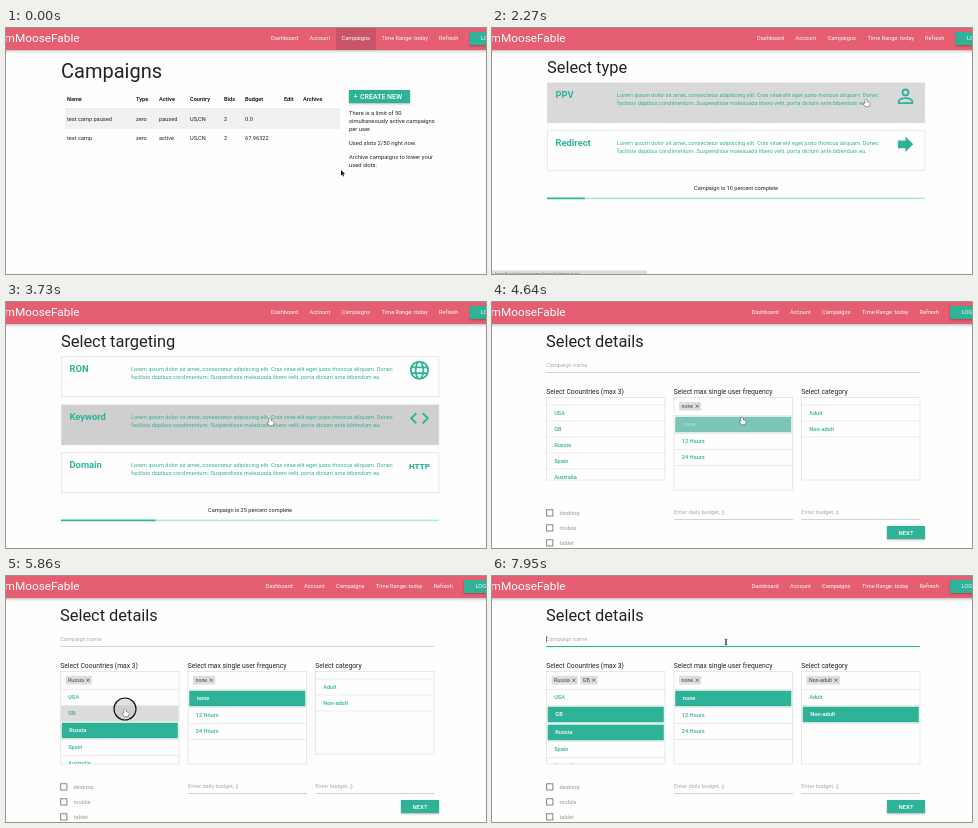
Write an HTML page with a canvas that moves like this. It is 480 by 246 pixels and loops after 8000 ms.

```html
<!DOCTYPE html>
<html lang="en">
<head>
<meta charset="utf-8">
<title>Campaign wizard</title>
<style>
html, body { margin: 0; width: 100%; height: 100%; overflow: hidden; background: #fefefe; }
canvas { display: block; width: 480px; height: 246px; }
</style>
</head>
<body>
<canvas id="stage"></canvas>
<script>
const W = 480, H = 246, LOOP = 8000;
const TEAL = '#2eb398', LINE = '#dfdfdf', INK = '#222', GREY = '#aaa', BODY = 5.63;
const PAGE_TYPE = 1800, PAGE_TARGET = 2850, PAGE_DETAILS = 4000, FOCUS = 7800;

const canvas = document.getElementById('stage');
const dpr = window.devicePixelRatio || 1;
canvas.width = W * dpr;
canvas.height = H * dpr;
const ctx = canvas.getContext('2d');

// Pointer stops: [time, x, y]
const path = [
  [100, 335, 142], [800, 368, 70], [1900, 368, 70], [2200, 374, 71],
  [3100, 374, 71], [3620, 264, 116], [4050, 264, 116], [4400, 250, 115],
  [4750, 250, 115], [5200, 112, 143], [5420, 112, 143], [5700, 119, 133],
  [6050, 119, 133], [6680, 345, 119], [7200, 345, 119], [7680, 234, 66]
];
const clicks = [1500, 2700, 4000, 4500, 5300, 5950, 6925, FOCUS];

const lists = [
  { x: 54.5, title: 'Select Coountries (max 3)', max: 3, picks: [[2, 5300], [1, 5950]],
    items: ['USA', 'GB', 'Russia', 'Spain', 'Australia'] },
  { x: 182, title: 'Select max single user frequency', max: 1, picks: [[0, 4500]],
    items: ['none', '12 Hours', '24 Hours'] },
  { x: 309.5, title: 'Select category', max: 1, picks: [[1, 6925]],
    items: ['Adult', 'Non-adult'] }
];

const icons = {
  person: new Path2D('M12 5.9a2.1 2.1 0 1 1 0 4.2a2.1 2.1 0 0 1 0-4.2m0 9c2.97 0 6.1 1.46 6.1 2.1v1.1H5.9V17c0-.64 3.13-2.1 6.1-2.1M12 4a4 4 0 1 0 0 8a4 4 0 0 0 0-8zm0 9c-2.67 0-8 1.34-8 4v3h16v-3c0-2.66-5.33-4-8-4z'),
  arrow: new Path2D('M12 8V4l8 8-8 8v-4H4V8z'),
  code: new Path2D('M9.4 16.6L4.8 12l4.6-4.6L8 6l-6 6 6 6zM14.6 16.6l4.6-4.6-4.6-4.6L16 6l6 6-6 6z'),
  globe: new Path2D('M3 12a9 9 0 1 0 18 0a9 9 0 1 0-18 0M8 12a4 9 0 1 0 8 0a4 9 0 1 0-8 0M4 9h16M4 15h16')
};
const hand = new Path2D('M-.8 .6Q0-.6 .8 .6V3L3.2 3.6Q4 4 3.8 5L3 7.6H-.6L-2.6 4.8Q-2.4 3.6-.8 4.6Z');
const arrow = new Path2D('M0 0V5.6L1.3 4.5L2.2 6.5L3.1 6.1L2.2 4.1H4Z');

let now, mouse, pointer;

const clamp = v => Math.max(0, Math.min(1, v));
const mix = (a, b, k) => `rgb(${a.map((v, i) => Math.round(v + (b[i] - v) * k))})`;

function box(x, y, w, h, color) {
  ctx.fillStyle = color;
  ctx.fillRect(x, y, w, h);
}

function frame(x, y, w, h, color = LINE, width = 0.7) {
  ctx.strokeStyle = color;
  ctx.lineWidth = width;
  ctx.strokeRect(x, y, w, h);
}

// y is the middle of the capitals
function text(str, x, y, { size = BODY, color = INK, weight = 400, align = 'left' } = {}) {
  ctx.font = `${weight} ${size}px Roboto, sans-serif`;
  ctx.fillStyle = color;
  ctx.textAlign = align;
  ctx.fillText(str, x, y + size * 0.355);
}

function shadowed(color, blur, offset, draw) {
  ctx.save();
  ctx.shadowColor = color;
  ctx.shadowBlur = blur * dpr;
  ctx.shadowOffsetY = offset * dpr;
  draw();
  ctx.restore();
}

function button(x, y, w, h) {
  shadowed('rgba(0,0,0,.3)', 2, 0.8, () => box(x, y, w, h, TEAL));
}

function over(x, y, w, h) {
  return mouse.x >= x && mouse.x < x + w && mouse.y >= y && mouse.y < y + h;
}

function locate(t) {
  const next = path.findIndex(stop => stop[0] > t);
  if (next === 0 || next < 0) {
    const [, x, y] = next ? path[path.length - 1] : path[0];
    return { x, y };
  }
  const [t0, x0, y0] = path[next - 1], [t1, x1, y1] = path[next];
  const p = (t - t0) / (t1 - t0), k = p * p * (3 - 2 * p);
  return { x: x0 + (x1 - x0) * k, y: y0 + (y1 - y0) * k };
}

function header() {
  const home = now < PAGE_TYPE, shift = now < PAGE_DETAILS ? 0 : -5.5;
  shadowed('rgba(0,0,0,.3)', 3, 1, () => box(-5, -5, W + 10, 27, '#e55e71'));
  if (home) box(330, 0, 40, 22, '#c95468');
  const white = { color: '#fff' };
  text('mMooseFable', 73.5, 10, { size: 11.8, color: '#fff', align: 'right' });
  [['Dashboard', 265], ['Account', 303.5], ['Campaigns', 335.5], ['Time Range: today', 375.5], ['Refresh', 433]]
    .forEach(([label, x]) => text(label, x + shift, 10, white));
  button(463.5 + shift, 4, 40, 13);
  text('LOGOUT', 475 + shift, 10.5, white);
}

function home() {
  text('Campaigns', 55, 43, { size: 20 });
  const columns = [61, 130, 153, 184, 218, 239, 278, 297];
  const row = (cells, y, weight) => cells.forEach((c, i) => text(c, columns[i], y, { weight }));
  box(59, 81, 275, 20, '#f1f1f1');
  box(59, 80.6, 275, 0.6, '#d4d4d4');
  row(['Name', 'Type', 'Active', 'Country', 'Bids', 'Budget', 'Edit', 'Archive'], 71.5, 700);
  row(['test camp paused', 'zero', 'paused', 'US,CN', '2', '0.0'], 91, 400);
  row(['test camp', 'zero', 'active', 'US,CN', '2', '67.96322'], 110.5, 400);

  button(343, 62, 61, 13);
  if (over(343, 62, 61, 13)) pointer = 'hand';
  text('+', 347.5, 68.5, { size: 7.5, color: '#fff' });
  text('CREATE NEW', 354, 68.7, { size: 7, color: '#fff', weight: 500 });
  [['There is a limit of 50', 84.5], ['simultaneously active campaigns', 93], ['per user.', 101],
   ['Used slots 2/50 right now.', 115], ['Archive campaigns to lower your', 128.5], ['used slots.', 137]]
    .forEach(([line, y]) => text(line, 343, y, { size: 5.8 }));
}

function icon(name, y) {
  if (name === 'http') {
    text('HTTP', 413.5, y - 0.5, { size: 8, color: TEAL, weight: 900, align: 'center' });
    return;
  }
  ctx.save();
  ctx.translate(413.5, y);
  ctx.scale(0.96, 0.96);
  ctx.translate(-12, -12);
  ctx.fillStyle = ctx.strokeStyle = TEAL;
  ctx.lineWidth = 1.9;
  if (name === 'globe') ctx.stroke(icons.globe);
  else ctx.fill(icons[name], 'evenodd');
  ctx.restore();
}

function chooser(title, cards, percent, hoverColor) {
  text(title, 55, 39, { size: 16.4 });
  cards.forEach(([label, name], i) => {
    const y = 55 + i * 48;
    if (over(55, y, 378, 40)) {
      box(55, y, 378, 40, hoverColor);
      pointer = 'hand';
    }
    frame(55.3, y - 0.2, 377.6, 40);
    text(label, 63.5, y + 12, { size: 9.4, color: TEAL, weight: 700 });
    text('Lorem ipsum dolor sit amet, consectetur adipiscing elit. Cras vitae elit eget justo rhoncus aliquam. Donec', 125, y + 12, { color: TEAL });
    text('facilisis dapibus condimentum. Suspendisse malesuada libero velit, porta dictum ante bibendum eu.', 125, y + 20, { color: TEAL });
    icon(name, y + 13.3);
  });
  const y = 64 + cards.length * 48;
  text(`Campaign is ${percent} percent complete`, 244, y, { align: 'center' });
  box(55, y + 9.6, 378, 1.6, '#a9eadb');
  box(55, y + 9.6, 3.78 * percent, 1.6, TEAL);
}

function typePage() {
  chooser('Select type', [['PPV', 'person'], ['Redirect', 'arrow']], 10, '#d9d9d9');
  if (now > 1950) {
    box(0, 242.5, 155, 4, '#dcdcdc');
    text('localhost/campaigns/create/type/ppv', 3, 246, { size: 5, color: '#777' });
  }
}

function targetPage() {
  chooser('Select targeting', [['RON', 'globe'], ['Keyword', 'code'], ['Domain', 'http']], 25, '#cfcfcf');
}

function tag(label, x) {
  ctx.font = '400 5.3px Roboto, sans-serif';
  const w = ctx.measureText(label).width + 10.5;
  ctx.fillStyle = '#dedede';
  ctx.beginPath();
  ctx.roundRect(x, 99.8, w, 8.8, 0.8);
  ctx.fill();
  text(label, x + 2.5, 104.3, { size: 5.3, color: '#444' });
  const cx = x + w - 4, cy = 104.2;
  ctx.strokeStyle = '#444';
  ctx.lineWidth = 0.7;
  ctx.beginPath();
  for (const s of [-1, 1]) {
    ctx.moveTo(cx - 1.6, cy - 1.6 * s);
    ctx.lineTo(cx + 1.6, cy + 1.6 * s);
  }
  ctx.stroke();
  return w;
}

function list({ x, title, items, picks, max }) {
  const w = 118.5, picked = picks.filter(p => now >= p[1]);
  const bottom = picked.length ? 188 : 178;
  let y = picked.length ? 113.5 : 103;
  text(title, x - 0.3, 90, { size: 6.75 });

  ctx.save();
  ctx.beginPath();
  ctx.rect(x, 95, w, bottom - 95);
  ctx.clip();
  let tagX = x + 5;
  picked.forEach(([i]) => tagX += tag(items[i], tagX) + 2.5);
  box(x, y - 0.3, w, 0.6, LINE);
  if (over(x, y, w, bottom - y)) pointer = 'hand';
  items.forEach((item, i) => {
    const pick = picked.find(p => p[0] === i), h = pick ? 18 : 16;
    if (pick) {
      const k = clamp((now - pick[1]) / 250);
      box(x + 1.2, y + 1.2, w - 2.4, 15.6, mix([221, 221, 221], [46, 179, 152], k));
      text(item, x + 8.8, y + 9, { weight: 500, color: mix([46, 179, 152], [255, 255, 255], k) });
    } else {
      if (picked.length < max && over(x, y, w, h)) box(x + 0.5, y + 0.3, w - 1, h - 0.6, '#dcdcdc');
      text(item, x + 7.7, y + 8, { weight: 500, color: TEAL });
    }
    y += h;
    box(x, y - 0.3, w, 0.6, LINE);
  });
  ctx.restore();
  frame(x, 95.6, w, bottom - 95.6);
}

function detailsPage() {
  const hint = { color: GREY }, drop = now < lists[1].picks[0][1] ? -10 : 0;
  text('Select details', 54, 39, { size: 16.4 });
  text('Campaign name', 54.2, 63, hint);
  box(54, 70.3, 374, 0.5, '#a5a5a5');
  if (now >= FOCUS) {
    box(54, 70, 374, 1.1, TEAL);
    box(54, 60, 0.6, 6.5, INK);
  }
  if (over(54, 55, 374, 17)) pointer = 'beam';
  lists.forEach(list);

  ['desktop', 'mobile', 'tablet'].forEach((label, i) => {
    const y = 211 + i * 15 + drop;
    frame(54.7, y - 3.2, 6.2, 6.2, '#666', 0.8);
    text(label, 67.5, y + 0.3, { color: '#999' });
  });
  [['Enter daily budget, $', 182], ['Enter budget, $', 309.3]].forEach(([label, x]) => {
    text(label, x, 210 + drop, hint);
    box(x, 217.3 + drop, 119, 0.5, '#a5a5a5');
  });
  button(395, 224 + drop, 38, 13);
  text('NEXT', 414, 230.7 + drop, { size: 6, color: '#fff', weight: 500, align: 'center' });
}

function cursor() {
  const { x, y } = mouse;
  if (clicks.some(t => now >= t - 170 && now < t - 20)) {
    ctx.beginPath();
    ctx.arc(x, y, 11, 0, 7);
    ctx.fillStyle = 'rgba(190,190,190,.45)';
    ctx.fill();
    ctx.strokeStyle = '#111';
    ctx.lineWidth = 1.2;
    ctx.stroke();
  }
  ctx.save();
  ctx.translate(x, y);
  ctx.lineJoin = 'round';
  if (pointer === 'beam') {
    ctx.strokeStyle = '#222';
    ctx.lineWidth = 0.8;
    ctx.stroke(new Path2D('M-1.3-2.8Q0-2.8 0-2V2Q0 2.8-1.3 2.8M1.3-2.8Q0-2.8 0-2V2Q0 2.8 1.3 2.8'));
  } else {
    const isHand = pointer === 'hand', shape = isHand ? hand : arrow;
    ctx.fillStyle = isHand ? '#fff' : '#111';
    ctx.strokeStyle = isHand ? '#222' : '#fff';
    ctx.lineWidth = isHand ? 0.8 : 1;
    ctx.stroke(shape);
    ctx.fill(shape);
  }
  ctx.restore();
}

function render() {
  now = performance.now() % LOOP;
  mouse = locate(now);
  pointer = 'arrow';
  ctx.setTransform(dpr, 0, 0, dpr, 0, 0);
  box(0, 0, W, H, '#fefefe');
  header();
  if (now < PAGE_TYPE) home();
  else if (now < PAGE_TARGET) typePage();
  else if (now < PAGE_DETAILS) targetPage();
  else detailsPage();
  cursor();
  requestAnimationFrame(render);
}
render();
</script>
</body>
</html>
```
